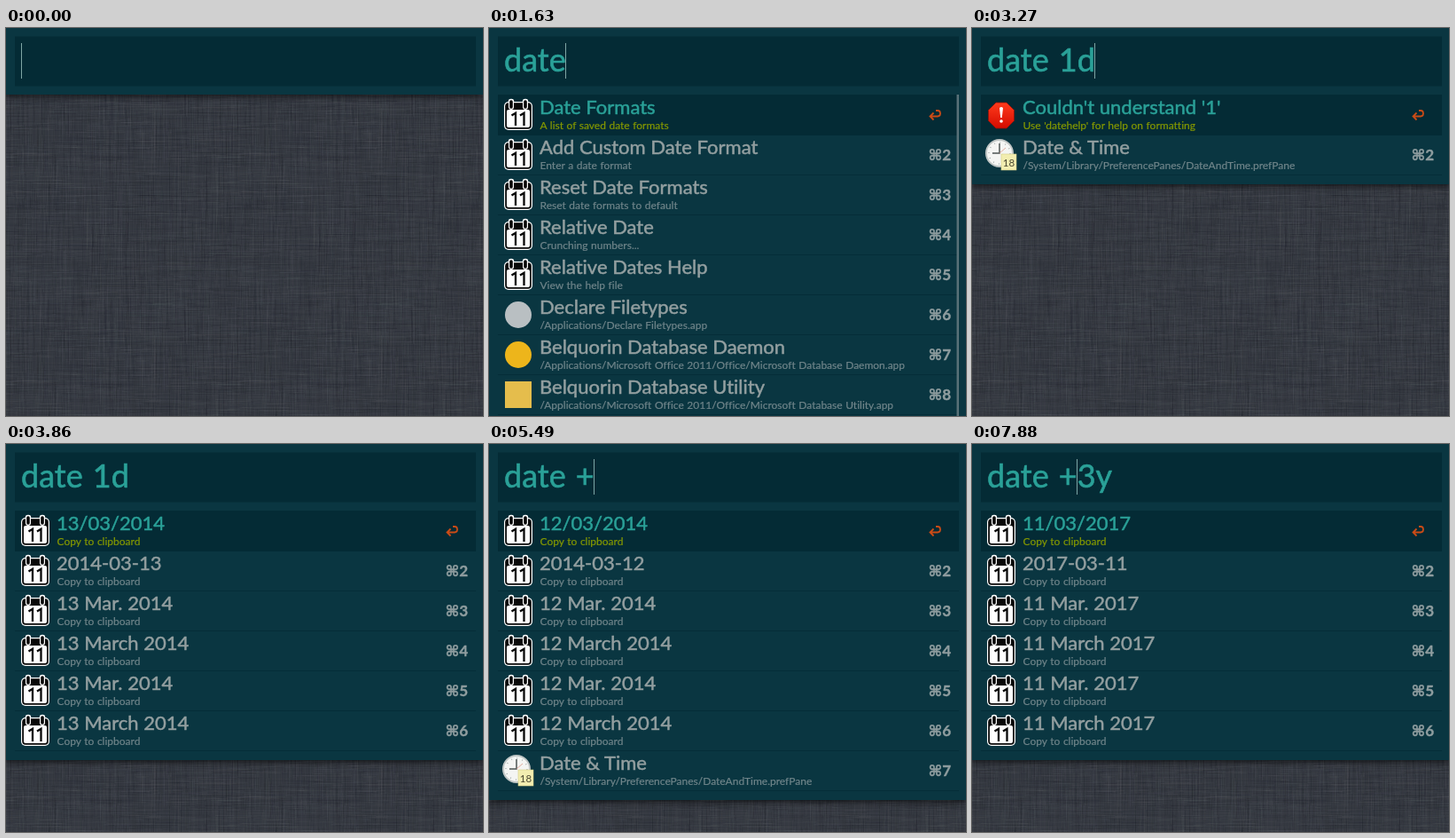
Recreate the animation shown at these times as an HTML page with a canvas. Size 538 by 437 pixels, loop 8000 ms.

```html
<!DOCTYPE html>
<html lang="en">
<head>
<meta charset="utf-8">
<title>Date launcher</title>
<style>
  html, body { margin: 0; width: 100%; height: 100%; overflow: hidden; background: #363a43; }
  #stage { position: relative; width: 538px; height: 437px; overflow: hidden; }
  #stage > * { position: absolute; left: 0; top: 0; }
  #panel { width: 538px; background: #0a3641; box-shadow: 0 2px 7px rgba(0, 0, 0, .65); }
  text { font-family: Lato, "Open Sans", sans-serif; font-variant-ligatures: none; white-space: pre; }
  #query { font-size: 36px; word-spacing: 2px; fill: #2aa198; stroke: #2aa198; stroke-width: .6px; }
  .title { font-size: 22px; fill: #939fa0; stroke: #939fa0; stroke-width: .5px; }
  .sub { font-size: 12px; word-spacing: .5px; fill: #70858a; stroke: #70858a; stroke-width: .2px; }
  .key { font: bold 17px Lato, "DejaVu Sans", sans-serif; fill: #8f9d9f; stroke: #8f9d9f; stroke-width: .4px; }
  .selected .title { fill: #2aa198; stroke: #2aa198; }
  .selected .sub { fill: #859900; stroke: #859900; }
</style>
</head>
<body>
<div id="stage">
  <canvas id="linen" width="538" height="437"></canvas>
  <div id="panel"></div>
  <svg width="538" height="437" viewBox="0 0 538 437">
    <defs>
      <linearGradient id="red" x2="0" y2="1">
        <stop stop-color="#ff3b1c"/><stop offset="1" stop-color="#d40c00"/>
      </linearGradient>
      <g id="calendar">
        <rect x="2" y="4" width="32" height="32" rx="5" fill="#fff"/>
        <path d="M10 4v6M26 4v6" stroke="#fff" stroke-width="6.500" stroke-linecap="round"/>
        <rect x="3.200" y="5.200" width="29.600" height="29.600" rx="4" fill="#080808"/>
        <rect x="5" y="13" width="26" height="20" rx="2" fill="#fff"/>
        <path d="M10 4v6M26 4v6" stroke="#fff" stroke-width="6" stroke-linecap="round"/>
        <path d="M10 4v6M26 4v6" stroke="#080808" stroke-width="3.600" stroke-linecap="round"/>
        <path d="M10.500 19.500l4.500-2.800v14.300M20 19.500l4.500-2.800v14.300" fill="none" stroke="#080808" stroke-width="2.300"/>
      </g>
      <g id="clock">
        <circle cx="16" cy="17" r="15" fill="#f4f5f3" stroke="#bfc5c4" stroke-width="2"/>
        <circle cx="16" cy="17" r="12" fill="none" stroke="#9aa3a3" stroke-width="1.5" stroke-dasharray=".8 5.483"/>
        <path d="M16 6v11H8" fill="none" stroke="#4d5555" stroke-width="1.5"/>
        <path d="M16 17l7-6" stroke="#d98d7a" stroke-width=".7"/>
        <rect x="18" y="18" width="17" height="18" fill="#f2edb0" stroke="#d4cd86" stroke-width=".6"/>
        <text x="26.5" y="31.5" text-anchor="middle" font-size="11.5" fill="#4a4832">18</text>
      </g>
      <g id="alert">
        <path d="M12 5h12l8.5 8.5v12L24 34H12l-8.500-8.500v-12z" fill="url(#red)" stroke="#8e1209" stroke-width=".8"/>
        <path d="M16 11q2-2 4 0l-1.200 11h-1.600z" fill="#fff"/>
        <circle cx="18" cy="26" r="1.800" fill="#fff"/>
      </g>
      <circle id="gold" cx="18" cy="19" r="15" fill="#edb51b"/>
      <rect id="amber" x="3" y="4" width="30" height="30" fill="#e5bd4c"/>
      <circle id="silver" cx="18" cy="19" r="15" fill="#b9bfc2"/>
    </defs>
    <rect x="10" y="9.500" width="520" height="56" fill="#042b35"/>
    <text id="query" x="17" y="49"></text>
    <rect id="caret" y="17" width="1" height="40" fill="#7fa6a5"/>
    <g id="list"></g>
  </svg>
</div>
<script>
const $ = id => document.getElementById(id);
const LOOP = 8000, TOP = 75, ROW = 45;

// Result rows: [icon, title, subtitle]
const office = '/Applications/Microsoft Office 2011/Office/Microsoft Database ';
const apps = [
  ['gold', 'Belquorin Database Daemon', office + 'Daemon.app'],
  ['amber', 'Belquorin Database Utility', office + 'Utility.app']
];
const prefs = ['clock', 'Date & Time', '/System/Library/PreferencePanes/DateAndTime.prefPane'];
const fail = arg => ['alert', `Couldn't understand '${arg}'`, "Use 'datehelp' for help on formatting"];
const dates = (d, y) => {
  const short = `${d} Mar. ${y}`, long = `${d} March ${y}`;
  return [`${d}/03/${y}`, `${y}-03-${d}`, short, long, short, long]
    .map(title => ['calendar', title, 'Copy to clipboard']);
};
const menu = [
  ['calendar', 'Date Formats', 'A list of saved date formats'],
  ['calendar', 'Add Custom Date Format', 'Enter a date format'],
  ['calendar', 'Reset Date Formats', 'Reset date formats to default'],
  ['calendar', 'Relative Date', 'Crunching numbers...'],
  ['calendar', 'Relative Dates Help', 'View the help file'],
  ['silver', 'Declare Filetypes', '/Applications/Declare Filetypes.app'],
  ...apps, prefs
];
const today = dates(12, 2014), tomorrow = dates(13, 2014), later = dates(11, 2017);
const all = [...apps, ...today, prefs];

// Steps: start time, query, caret index (-1 hides it), rows
const steps = [
  [0, '', 0, []],
  [450, '', -1, []],
  [1050, 'd', 1, []],
  [1200, 'da', 2, menu],
  [1340, 'dat', 3, menu],
  [1490, 'date', 4, menu],
  [1930, 'date ', 5, menu],
  [2080, 'date ', 5, all],
  [2680, 'date ', -1, all],
  [2970, 'date 1', 6, [...today, prefs]],
  [3120, 'date 1', 6, [fail('1'), prefs]],
  [3270, 'date 1d', 7, [fail('1'), prefs]],
  [3420, 'date 1d', 7, [fail('1')]],
  [3720, 'date 1d', 7, tomorrow],
  [3860, 'date 1d', -1, tomorrow],
  [4460, 'date 1', 6, tomorrow],
  [4600, 'date ', 5, [...apps, ...tomorrow, prefs]],
  [4750, 'date ', 5, [...apps, fail('1'), prefs]],
  [4900, 'date ', 5, all],
  [5190, 'date ', -1, all],
  [5490, 'date +', 6, [...today, prefs]],
  [5640, 'date +', 6, [fail('+')]],
  [5940, 'date +3', 7, [fail('+')]],
  [6090, 'date +3', 7, [fail('+3')]],
  [6390, 'date +3y', 7, [fail('+3')]],
  [6540, 'date +3y', 8, [fail('+3')]],
  [6840, 'date +3y', 8, later],
  [6990, 'date +3y', 7, later],
  [7580, 'date +3y', -1, later],
  [7880, 'date +3y', 6, later]
];

const escape = s => s.replace(/&/g, '&amp;');
const returnArrow = `<path d="M498 24.500h8q3-.2 3-3.300t-3-3.200h-2M501.500 20.500l-4 4 4 4"
  fill="none" stroke="#cb4b16" stroke-width="1.800"/>`;

function rowMarkup([icon, title, sub], i, rows) {
  const right = rows.length > 8 ? 526 : 530;
  const back = i === 0
    ? `<rect x="10" width="${right - 10}" height="46" fill="#042b35"/>`
    : `<rect x="10" y="45" width="${right - 10}" height="1" fill="#052d38"/>`;
  const hint = i === 0 ? returnArrow : `<text class="key" x="495.500" y="29">⌘${i + 1}</text>`;
  return `<g class="${i === 0 ? 'selected' : ''}" transform="translate(0 ${TOP + ROW * i})">
    ${back}<use href="#${icon}" x="15" y="4"/>
    <text class="title" x="57" y="22">${escape(title)}</text>
    <text class="sub" x="57.500" y="39">${escape(sub)}</text>${hint}</g>`;
}

function show([, query, caret, rows]) {
  const n = rows.length;
  $('panel').style.height = (n ? 86 + ROW * n : TOP) + 'px';
  $('query').textContent = query;
  $('caret').style.visibility = caret < 0 ? 'hidden' : 'visible';
  const offset = caret > 0 ? $('query').getSubStringLength(0, caret) : 0;
  $('caret').setAttribute('x', Math.floor(17 + offset));
  const bar = n > 8 ? '<rect x="527.500" y="75" width="2.500" height="362" fill="#587178"/>' : '';
  $('list').innerHTML = rows.slice(0, 8).map(rowMarkup).join('') + bar;
}

function paintLinen() {
  const size = 256, tile = document.createElement('canvas');
  tile.width = tile.height = size;
  const c = tile.getContext('2d');
  let seed = 71;
  const rnd = () => (seed = seed * 16807 % 2147483647) / 2147483647;
  c.fillStyle = '#353941';
  c.fillRect(0, 0, size, size);
  for (let i = 0; i < 4600; i++) {
    const x = Math.floor(rnd() * size), y = Math.floor(rnd() * size);
    const len = 8 + rnd() * 50, tone = rnd() < .5 ? '18,20,28' : '110,114,120';
    c.fillStyle = `rgba(${tone},${.02 + rnd() * .07})`;
    const [w, h] = i % 2 ? [len, 1] : [1, len];
    // Repeat past the edges so the tile joins up
    for (const dx of [0, size]) for (const dy of [0, size]) c.fillRect(x - dx, y - dy, w, h);
  }
  const g = $('linen').getContext('2d');
  g.fillStyle = g.createPattern(tile, 'repeat');
  g.fillRect(0, 0, 538, 437);
}

let current = -1;
function frame() {
  const t = performance.now() % LOOP;
  const next = steps.findLastIndex(step => step[0] <= t);
  if (next !== current) show(steps[current = next]);
  requestAnimationFrame(frame);
}
paintLinen();
frame();
</script>
</body>
</html>
```
